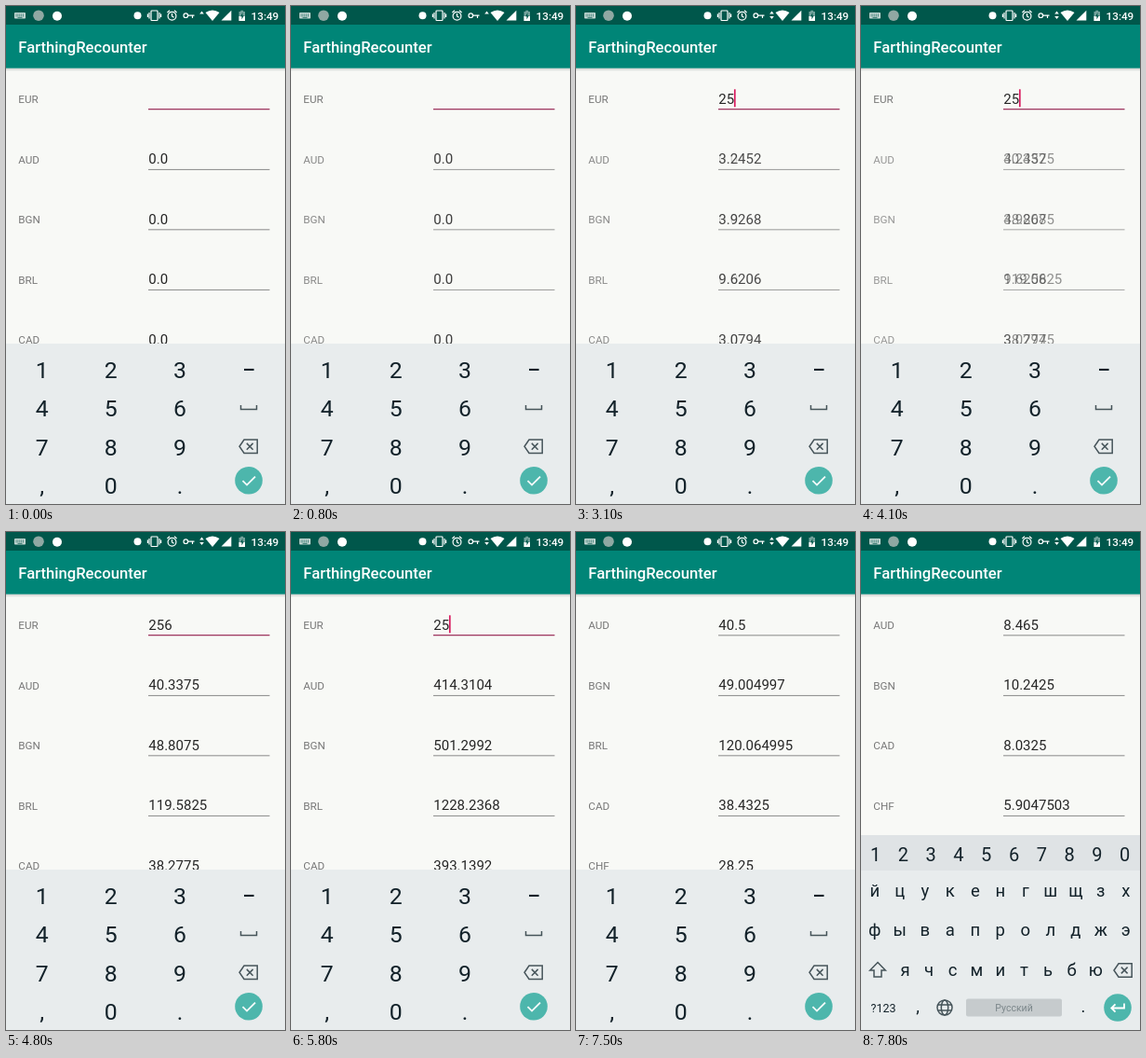
Animation, 300 px wide and 534 px high, one loop 8 s. Source, as an HTML page:

```html
<!DOCTYPE html>
<html lang="en">
<head>
<meta charset="utf-8">
<title>Exchange rates</title>
<style>
  html, body { margin: 0; width: 100%; height: 100%; overflow: hidden; background: #f8f9f6; }
  svg { display: block; width: 100vw; height: 100vh; font-family: Roboto, sans-serif; }
  .label { font-size: 11.67px; fill: #777; }
  .value { font-size: 15px; fill: #262626; }
  .title { font-size: 16.67px; font-weight: 500; fill: #fff; }
  .clock { font-size: 11.7px; font-weight: 500; fill: #fff; }
  .key { fill: #13222a; text-anchor: middle; }
  .pad { font-size: 24.8px; }
  .num { font-size: 20px; }
  .letter { font-size: 18.5px; }
  .mode { font-size: 12.5px; }
  .lang { font-size: 10.5px; fill: #7c878b; }
  .icon { fill: none; stroke: #46545a; stroke-width: 1.5; }
  .thin { fill: none; stroke: #fff; stroke-width: 1.2; }
</style>
</head>
<body>
<svg viewBox="0 0 300 534" preserveAspectRatio="none">
  <defs>
    <linearGradient id="shade" x2="0" y2="1">
      <stop offset="0" stop-color="#000" stop-opacity=".17"/>
      <stop offset="1" stop-color="#000" stop-opacity="0"/>
    </linearGradient>
    <g id="erase" class="icon">
      <path d="M-5-7.2H9.2V7.2H-5L-10 0Z"/>
      <path d="M-2.2-3.4 4.6 3.4M4.6-3.4-2.2 3.4"/>
    </g>
  </defs>

  <rect width="300" height="534" fill="#f8f9f6"/>
  <g id="list"></g>

  <g id="bars">
    <rect y="66.7" width="300" height="3.5" fill="url(#shade)"/>
    <rect y="20" width="300" height="46.7" fill="#008577"/>
    <rect width="300" height="20" fill="#00574b"/>
    <text class="title" x="13.3" y="49.7">FarthingRecounter</text>
    <rect x="9" y="7" width="12" height="6.5" rx=".8" fill="#c3d6d2"/>
    <path d="M10.5 9H19.5M10.5 10.8H19.5" stroke="#00574b" stroke-width=".9" stroke-dasharray="1 .9"/>
    <path d="M12.5 12.4H17.5" stroke="#00574b" stroke-width=".7"/>
    <circle cx="35" cy="10.2" r="5.8" fill="#90a8a3"/>
    <circle cx="55" cy="10.8" r="5" fill="#fff"/>
    <circle cx="141.5" cy="10.2" r="4" fill="#fff"/>
    <g class="thin">
      <rect x="156" y="5" width="7" height="10.5" rx=".8"/>
      <path d="M154 7V13.5M165 7V13.5M152.4 8.5V12M166.6 8.5V12"/>
      <circle cx="178.5" cy="10.8" r="4.4"/>
      <path d="M178.5 8V11L180.6 12.3M173.4 7 176 4.8M183.6 7 181 4.8"/>
      <circle cx="193.3" cy="10.2" r="2.3"/>
      <path d="M195.6 10.2H202.5M200.5 10V13"/>
    </g>
    <g fill="#fff">
      <path d="M208.2 8.6 210.5 5.6 212.8 8.6Z"/>
      <path id="down" d="M208.2 11 210.5 14 212.8 11Z"/>
      <path d="M214.5 7Q222 2 229.5 7L222 16Z"/>
      <path d="M231.5 15.5H242.3V4.7Z"/>
      <path d="M250.5 6H252.3V4.8H255.2V6H257V16H250.5Z" opacity=".45"/>
      <path d="M250.5 11H257V16H250.5Z"/>
    </g>
    <path d="M254.4 7 252 11.3H253.5V14.4L255.8 10.2H254.4Z" fill="#00574b"/>
    <text class="clock" x="263.6" y="14.6">13:49</text>
  </g>

  <g id="numeric">
    <rect y="362" width="300" height="172" fill="#e8eced"/>
    <rect id="press" width="74" height="39" rx="2" fill="#000" opacity=".09"/>
    <rect x="256" y="388.9" width="10.6" height="2.1" fill="#13222a"/>
    <path class="icon" d="M252.5 428V432.4H269.5V428"/>
    <use href="#erase" x="261" y="472.3"/>
    <circle cx="261" cy="508.8" r="14.8" fill="#4db6ac"/>
    <path d="M254.5 509.1 259 513.6 268 504.6" fill="none" stroke="#fff" stroke-width="1.8"/>
  </g>

  <g id="letters">
    <rect y="325" width="300" height="209" fill="#e8eced"/>
    <rect y="325" width="300" height="38" fill="#dfe3e5"/>
    <path class="icon" d="M18 461.5 26.3 470H22V477H14V470H9.7Z"/>
    <use href="#erase" x="282" y="470"/>
    <g class="icon">
      <circle cx="90" cy="510" r="8"/>
      <ellipse cx="90" cy="510" rx="3.7" ry="8"/>
      <path d="M82.6 507H97.4M82.6 513H97.4"/>
    </g>
    <rect x="113" y="500.5" width="103" height="19" rx="2" fill="#c6cbcd"/>
    <circle cx="276" cy="510" r="14.8" fill="#4db6ac"/>
    <path d="M283 505.5V510.5H269.5M273.5 506.3 269.3 510.5 273.5 514.7" fill="none" stroke="#fff" stroke-width="1.8"/>
  </g>
</svg>
<script>
const LOOP = 8000, STEP = 100, PITCH = 64.5;
const byId = id => document.getElementById(id);
const clamp = v => Math.max(0, Math.min(1, v));
const ease = v => v * v * (3 - 2 * v);
const ramp = (t, from, length) => clamp((t - from) / length);
const show = (el, on) => el.setAttribute('visibility', on ? 'visible' : 'hidden');

function add(parent, tag, attrs, text) {
  const el = document.createElementNS('http://www.w3.org/2000/svg', tag);
  for (const name in attrs) el.setAttribute(name, attrs[name]);
  if (text) el.textContent = text;
  parent.append(el);
  return el;
}

// Keyboards
const numeric = byId('numeric'), letters = byId('letters');
const addKey = (board, style, text, x, y) =>
  add(board, 'text', { class: 'key ' + style, x, y }, text);
const addKeys = (board, style, chars, x, gap, y) =>
  [...chars].forEach((c, i) => addKey(board, style, c, x + gap * i, y));

['123', '456', '789', ',0.'].forEach((row, i) =>
  addKeys(numeric, 'pad', row, 38.6, 74.2, 398.9 + i * 41.3));
addKeys(letters, 'num', '1234567890', 15.5, 29.8, 352.5);
addKeys(letters, 'letter', 'йцукенгшщзх', 14.8, 27, 391);
addKeys(letters, 'letter', 'фывапролджэ', 14.8, 27, 433);
addKeys(letters, 'letter', 'ячсмитьбю', 47.5, 25.6, 475.5);
addKeys(letters, 'letter', ',.', 61, 178, 515);
addKey(letters, 'mode', '?123', 24, 514.5);
addKey(letters, 'lang', 'Русский', 164.5, 513.8);

// Currency rows: amounts after each rate update
const amounts = {
  EUR: [''],
  AUD: ['0.0', '3.2452', '40.3375', '414.3104', '40.5', '8.465'],
  BGN: ['0.0', '3.9268', '48.8075', '501.2992', '49.004997', '10.2425'],
  BRL: ['0.0', '9.6206', '119.5825', '1228.2368', '120.064995', '25'],
  CAD: ['0.0', '3.0794', '38.2775', '393.1392', '38.4325', '8.0325'],
  CHF: ['0.0', '2.2628', '28.1275', '288.9216', '28.25', '5.9047503']
};
const shifts = { BRL: -5, CAD: -1, CHF: -1 };
const list = byId('list');
const rows = Object.keys(amounts).map((code, i) => {
  const g = add(list, 'g', {});
  const base = add(g, 'g', {});
  add(base, 'text', { class: 'label', x: 13.3, y: 104 }, code);
  const height = i ? 0.9 : 1.3;
  add(base, 'rect', {
    x: 153, y: 111.3 - height, width: 130.5, height, fill: i ? '#7d7d7d' : '#a03a62'
  });
  const [before, after] = [0, 1].map(() => add(g, 'text', { class: 'value', x: 153.3, y: 104.5 }));
  return { code, i, g, base, before, after };
});
const input = rows[0];
const cursor = add(input.g, 'rect', { y: 89.3, width: 1.7, height: 19, fill: '#d81b60' });

// [start, amount index]
const updates = [[0, 0], [750, 0], [1850, 0], [2850, 1], [3950, 2], [5050, 3], [6050, 4], [7500, 5]];
const typed = [[0, ''], [2400, '2'], [3100, '25'], [4300, '256'], [5800, '25']];
const blinks = [300, 800, 1300, 1900, 2400, 2900, 3100, 3600, 4100, 4800, 5300, 6300, 6800, 7300];
// [start, column, row]
const presses = [[3000, 1, 1], [4200, 2, 1], [5700, 3, 2]];
const latest = (events, t) => events.findLastIndex(e => e[0] <= t);

function render(t) {
  const now = latest(updates, t);
  const [start, index] = updates[now];
  const previous = now ? updates[now - 1][1] : 0;
  const fade = ramp(t, start, 300);
  const scroll = ease(ramp(t, 6900, 400));
  const move = ease(ramp(t, 7500, 300));

  for (const row of rows) {
    const place = row.i - scroll + move * (shifts[row.code] || 0);
    row.g.setAttribute('transform', `translate(0 ${place * PITCH})`);
    if (row === input) continue;
    row.base.setAttribute('opacity', 1 - fade * (1 - fade));
    row.before.textContent = amounts[row.code][previous];
    row.after.textContent = amounts[row.code][index];
    row.before.setAttribute('opacity', 1 - fade);
    row.after.setAttribute('opacity', fade);
  }

  const text = typed[latest(typed, t)][1];
  input.after.textContent = text;
  cursor.setAttribute('x', 153.1 + text.length * 8.42);
  show(cursor, blinks.filter(b => b <= t).length % 2);

  const press = presses.find(p => t >= p[0] && t < p[0] + STEP);
  show(byId('press'), press);
  if (press) {
    byId('press').setAttribute('x', press[1] * 74.7 + 0.3);
    byId('press').setAttribute('y', 370 + press[2] * 41.4);
  }
  show(byId('down'), t >= 1300);

  const swapped = t >= 7600;
  numeric.style.display = swapped ? 'none' : '';
  letters.style.display = swapped ? '' : 'none';
}

// The screen advances ten times a second.
function tick() {
  const t = (performance.now() + 12) % LOOP;
  render(Math.floor(t / STEP) * STEP);
  requestAnimationFrame(tick);
}
tick();
</script>
</body>
</html>
```
